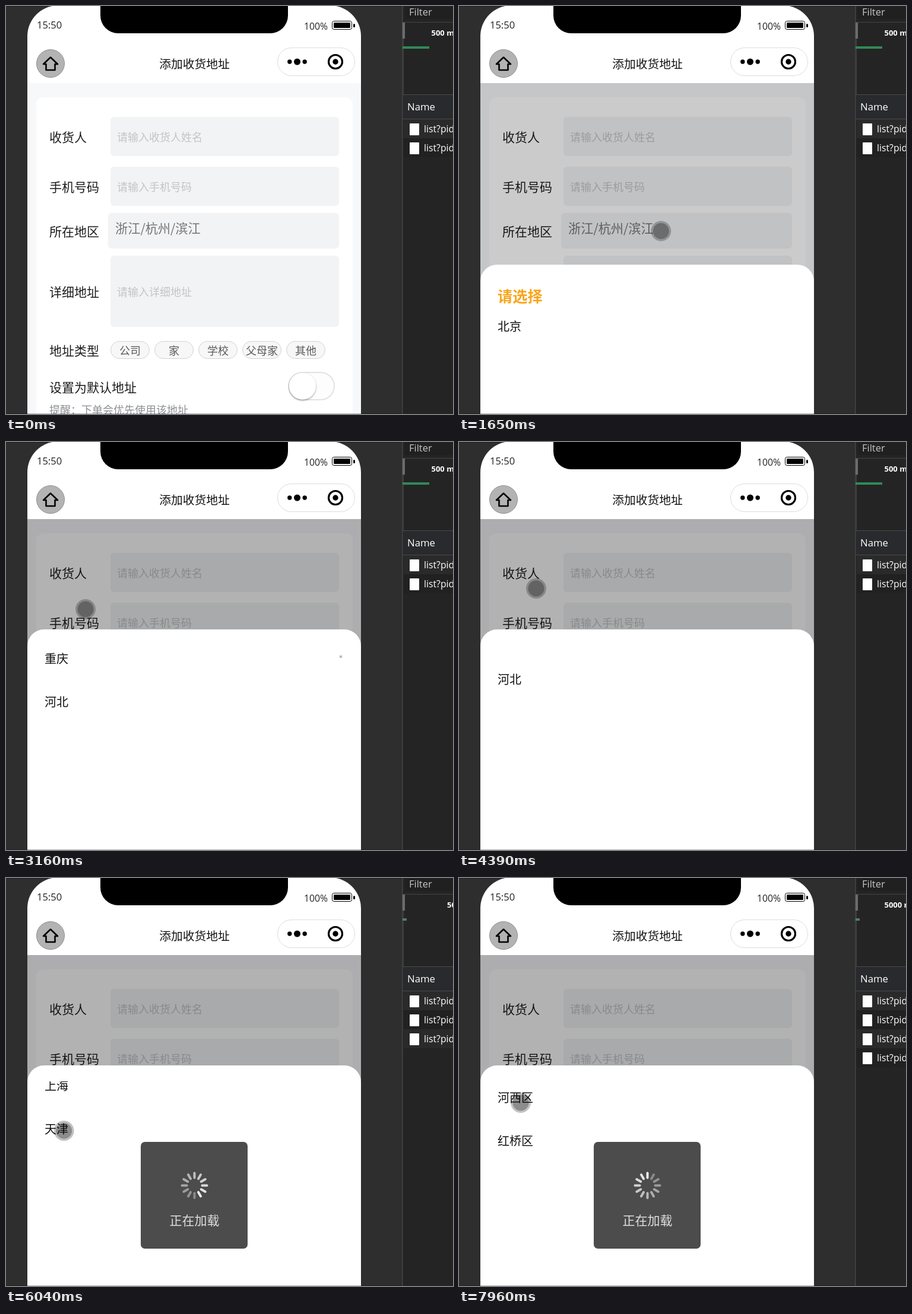
These frames come from a looping animation (753 by 688 pixels, 8 s). An HTML page:

```html
<!DOCTYPE html>
<html lang="zh">
<head>
<meta charset="utf-8">
<title>添加收货地址</title>
<style>
  html, body { margin: 0; width: 100%; height: 100%; overflow: hidden; background: #2e2e2e; }
  svg { display: block; width: 753px; height: 688px; }
  text { font-family: "Noto Sans CJK SC", "Noto Sans CJK", sans-serif; font-weight: 350; }
  .latin { font-family: "Open Sans", "Noto Sans", sans-serif; font-weight: 400; }
  .strong { font-weight: 500; }
  .bold { font-weight: 700; }
</style>
</head>
<body>
<svg id="stage" viewBox="0 0 753 688" xmlns="http://www.w3.org/2000/svg"></svg>
<script>
const LOOP = 8000;
const CARD = 73;        // height of one list item
const LIST_TOP = 343;   // top of the scrolling view

// Drawing helpers
const rect = (x, y, w, h, fill, r = 0, more = '') =>
  `<rect x="${x}" y="${y}" width="${w}" height="${h}" rx="${r}" fill="${fill}" ${more}/>`;
const dot = (x, y, r, fill, more = '') =>
  `<circle cx="${x}" cy="${y}" r="${r}" fill="${fill}" ${more}/>`;
// Text whose glyphs are centred vertically on cy
const text = (x, cy, size, str, fill, more = '') =>
  `<text x="${x}" y="${cy + size * 0.38}" font-size="${size}" fill="${fill}" ${more}>${str}</text>`;
const latin = (x, cy, size, str, fill, kind = '', more = '') =>
  `<text class="latin ${kind}" x="${x}" y="${cy + size * 0.36}" font-size="${size}" fill="${fill}" ${more}>${str}</text>`;
const middle = 'text-anchor="middle"';

const label = (cy, str) => text(73, cy, 21, str, '#1c1c1c');
const input = (y, h, name, hint) =>
  rect(176, y, 385, h, '#f2f3f5', 6) + label(y + h / 2 + 1, name) +
  text(187, y + h / 2 + 0.8, 18, hint, '#c3c4c6');

const tags = ['公司', '家', '学校', '父母家', '其他'].map((name, i) => {
  const x = 176.5 + i * 74;
  return rect(x, 565.5, 65, 29, '#f7f7f8', 14.5, 'stroke="#cfd2d7"') +
    text(x + 32.5, 581.5, 18, name, '#5a5a5a', middle);
}).join('');

const form =
  rect(36, 130, 562, 558, '#f7f8fa') +
  rect(51, 154, 533, 560, '#fff', 12) +
  input(187, 66, '收货人', '请输入收货人姓名') +
  input(271, 66, '手机号码', '请输入手机号码') +
  input(421, 120, '详细地址', '请输入详细地址') +
  rect(172, 349, 389, 60, '#f2f3f5', 6) +
  label(380.5, '所在地区') + text(184, 374.7, 21.2, '浙江/杭州/滨江', '#757575') +
  label(581, '地址类型') + tags +
  label(643, '设置为默认地址') +
  rect(476, 618, 77, 46, '#fdfdfd', 23, 'stroke="#e2e2e2" stroke-width="2"') +
  dot(499.5, 641, 22.5, '#fff', 'filter="url(#soft)"') +
  text(73, 681, 18, '提醒：下单会优先使用该地址', '#8c8f94');

const nav =
  latin(52, 32, 16.5, '15:50', '#222') +
  latin(502, 34, 15.8, '100%', '#222') +
  rect(549.5, 25.5, 33, 14, '#fff', 3, 'stroke="#000"') +
  rect(552, 28, 28, 9, '#000', 1) +
  rect(585, 30, 3, 6, '#000', 1.5) +
  rect(159, -40, 316, 86, '#000', 30) +
  dot(75, 97, 23.5, '#b3b3b3', 'stroke="#8f8f8f"') +
  '<path d="M63 98L75 86.5L87 98H82.5V108H67.5V98Z" fill="none" stroke="#000" stroke-width="2.6" stroke-linejoin="round"/>' +
  text(317.5, 97.5, 19.8, '添加收货地址', '#111', middle) +
  rect(457.5, 70.5, 130, 47, '#fff', 23.5, 'stroke="#dcdcdc"') +
  [-1, 0, 1].map(i => dot(490.5 + i * 12.7, 94, i ? 3.7 : 5.5, '#000')).join('') +
  dot(555, 94, 11.5, 'none', 'stroke="#000" stroke-width="3.2"') + dot(555, 94, 4.7, '#000');

const request = i => {
  const y = 191 + i * 32;
  return `<g id="req${i}">` + rect(670, y, 83, 32, i % 2 ? '#212121' : '#2a2a2a') +
    rect(680, y + 7, 16, 20, '#fff', 1) +
    latin(704, y + 16, 15.8, 'list?pid=0', '#fff', 'strong') + '</g>';
};

const panel =
  rect(667, 0, 86, 688, '#242424') +
  rect(667, 0, 1.5, 688, '#454545') +
  rect(672, 0, 81, 22, '#202020') +
  latin(679, 10, 16.5, 'Filter', '#c4c7cb') +
  rect(668, 27, 85, 1, '#444') +
  rect(668, 28, 4, 27, '#6c6c6c') + rect(669, 55, 1, 95, '#444') +
  latin(716.5, 45, 13, '500 ms', '#fff', 'bold', 'id="scale"') +
  rect(668, 68, 45, 4, '#2f8a58', 0, 'id="bar"') +
  rect(668, 149, 85, 1, '#4a4a4a') + rect(669, 150, 84, 40, '#292a2d') +
  latin(676, 170, 16.8, 'Name', '#fff', 'strong') +
  rect(668, 190, 85, 1, '#4a4a4a') +
  [0, 1, 2, 3].map(request).join('');

const list = (id, names) => `<g id="${id}">` +
  names.map((name, i) => text(65, 420 + i * CARD, 20, name, '#111')).join('') + '</g>';

const sheet =
  '<g id="sheet">' + rect(36, 316, 562, 420, '#fff', 28) +
  '<g clip-path="url(#view)"><g id="scroll">' +
  text(65, LIST_TOP + 26, 25.2, '请选择', '#f8a51b', 'class="bold"') +
  list('provinces', ['北京', '上海', '天津', '重庆', '河北', '山西', '河南']) +
  list('districts', ['东丽区', '和平区', '河北区', '河东区', '河西区', '红桥区', '津南区']) +
  '</g></g>' + rect(562, 348, 4, 4, '#b9b9b9', 0, 'id="thumb"') + '</g>';

const spokes = Array.from({ length: 12 }, (_, i) =>
  rect(-2, -23, 4, 12, '#fff', 2,
    `opacity="${0.3 + 0.05 * (i || 12)}" transform="rotate(${i * 30})"`)).join('');

const toast = '<g id="toast">' + rect(227, 445, 180, 180, '#4c4c4c', 7) +
  `<g transform="translate(317.5 518.5)"><g id="spin">${spokes}</g></g>` +
  text(317.5, 577, 21, '正在加载', '#dedede', middle) + '</g>';

const cursor = '<g id="cursor">' + dot(0, 0, 17, 'rgba(0,0,0,.24)') +
  dot(0, 0, 13.5, 'rgba(0,0,0,.27)') + '</g>';

document.getElementById('stage').innerHTML =
  `<defs>
    <clipPath id="phone"><rect x="36" y="-1" width="562" height="800" rx="52"/></clipPath>
    <clipPath id="view"><rect x="36" y="${LIST_TOP}" width="562" height="109"/></clipPath>
    <filter id="soft" x="-20%" y="-20%" width="140%" height="150%">
      <feDropShadow dx="0" dy="1.5" stdDeviation="1.5" flood-color="#000" flood-opacity=".4"/>
    </filter>
  </defs>` +
  rect(0, 0, 753, 688, '#2e2e2e') + rect(0, 0, 753, 1, '#1d1d1d') + panel +
  '<g clip-path="url(#phone)">' + rect(36, -2, 562, 690, '#fff') + form +
  rect(36, 130, 562, 558, '#000', 0, 'id="shade"') + nav + sheet + '</g>' +
  rect(0, 687, 667, 1, 'rgba(0,0,0,.3)') + toast + cursor;

// Cursor moves: start, end, x, y reached; it rests in between
const ENTER = { x: 637, y: 660 };
const moves = [
  [530, 1100, 362, 390], [1100, 1310, 356, 373],
  [1580, 1780, 300, 396], [1780, 1990, 230, 371], [1990, 2400, 118, 550],
  [2400, 3160, 134, 282], [3290, 3570, 125, 488], [3640, 3990, 130, 247],
  [4460, 4950, 100, 484], [4950, 5290, 95, 403],
  [5290, 5420, 88, 411], [5560, 6240, 100, 430],
  [6380, 6780, 118, 240], [6780, 7350, 104, 379]
];

const clamp = v => Math.min(1, Math.max(0, v));
const ease = p => (1 - Math.cos(Math.PI * p)) / 2;

function pointer(t) {
  let { x, y } = ENTER;
  for (const [from, to, nx, ny] of moves) {
    const p = ease(clamp((t - from) / (to - from)));
    x += (nx - x) * p;
    y += (ny - y) * p;
  }
  return { x, y };
}

// The first list follows the finger, the second one is flicked and slows down
function scrolled(t) {
  if (t >= 6240) return 342 * (1 - (1 - clamp((t - 6380) / 1370)) ** 2.45);
  if (t < 1780) return 0;
  const grip = t < 2330 ? 395 : 535;
  return 1.083 * Math.max(0, grip - pointer(Math.min(t, 5290)).y);
}

const el = {};
document.querySelectorAll('#stage [id]').forEach(n => el[n.id] = n);
const show = (node, on) => node.style.display = on ? '' : 'none';
const within = (t, ...spans) => spans.some(([a, b]) => t >= a && t < b);
const set = (node, attrs) => { for (const k in attrs) node.setAttribute(k, attrs[k]); };

function draw(t) {
  const open = 1 - (1 - clamp((t - 1560) / 290)) ** 3;
  show(el.sheet, open > 0);
  set(el.sheet, { transform: `translate(0 ${372 * (1 - open)})` });
  set(el.shade, { opacity: 0.3 * open });

  const { x, y } = pointer(t);
  show(el.cursor, t >= 530);
  set(el.cursor, { transform: `translate(${x} ${y})` });

  const s = scrolled(t), second = t >= 6240;
  set(el.scroll, { transform: `translate(0 ${-s})` });
  show(el.provinces, !second);
  show(el.districts, second);
  show(el.thumb, within(t, [1850, 4390], [4530, 5560], [6440, 7750]));
  set(el.thumb, { y: 348.5 + s * (second ? 0.073 : 0.042), height: second ? 7 : 4 });

  const third = t >= 5560, fourth = t >= 7890;
  show(el.toast, (third && !second) || fourth);
  const step = Math.floor((t - (fourth ? 7890 : 5560)) * 12 / 1000);
  set(el.spin, { transform: `rotate(${step * 30})` });

  show(el.req2, third);
  show(el.req3, fourth);
  set(el.bar, { width: third ? 7 : 45, fill: third ? '#4f7f6c' : '#2f8a58' });
  el.scale.textContent = third ? '5000 ms' : '500 ms';
  set(el.scale, { x: third && !fourth ? 743 : 716.5 });
}

const start = performance.now();
function tick() {
  draw((performance.now() - start) % LOOP);
  requestAnimationFrame(tick);
}
draw(0);
requestAnimationFrame(tick);
</script>
</body>
</html>
```
